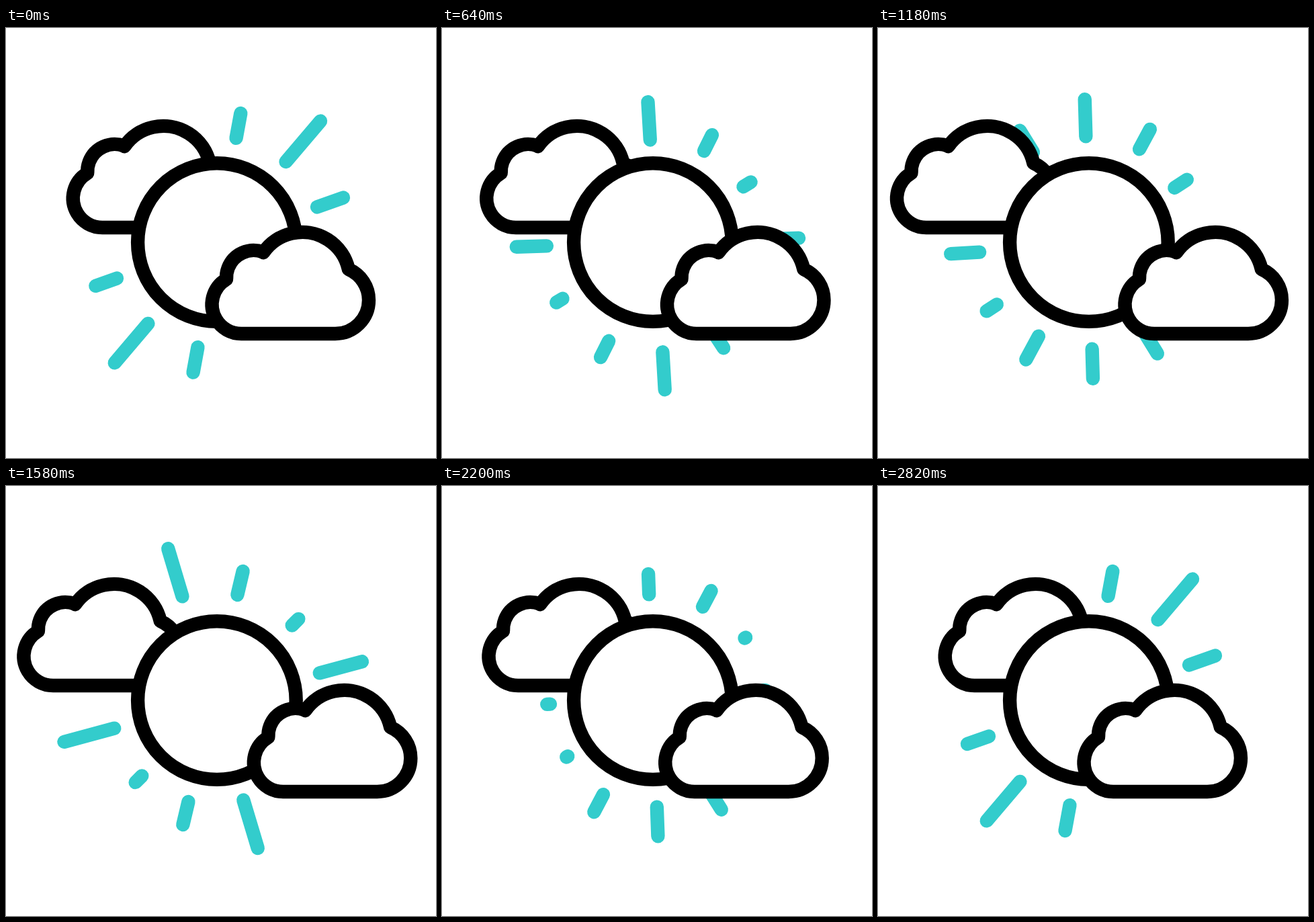
Recreate the animation shown at these times as an HTML page with a canvas. Size 640 by 640 pixels, loop 3.6 s.

```html
<!DOCTYPE html>
<html lang="en">
<head>
<meta charset="utf-8">
<title>Sun and clouds</title>
<style>
html, body { margin: 0; width: 100%; height: 100%; overflow: hidden; background: #fff; }
canvas { display: block; width: 640px; height: 640px; }
</style>
</head>
<body>
<canvas id="stage" width="640" height="640"></canvas>
<script>
const ctx = document.getElementById('stage').getContext('2d');
const LOOP = 3600, RUN = 2800, STEP = 20;
const CX = 314, CY = 319.5, INNER = 158.2, LEAD = 55;
const TEAL = '#33cccc';

const smooth = s => s * s * (3 - 2 * s);

// Eased value at t through [time, value] keys
function ease(keys, t) {
  const i = Math.max(1, keys.findIndex(k => k[0] >= t));
  const [t0, v0] = keys[i - 1], [t1, v1] = keys[i];
  return v0 + (v1 - v0) * smooth((t - t0) / (t1 - t0));
}

// Stretch of the rays over time, as a share of their full length
const SHORT = [[0, 1], [720, 0.28], [1200, 1], [1540, 0.36], [1900, 0.32], [2400, 1], [RUN, 1]];
const LONG = [[0, 1], [300, 1], [930, 0.4], [1500, 0.98], [2000, 0.27], [2580, 1], [RUN, 1]];
const PULSE = [[0, 0], [420, 1], [950, 0.25], [1480, 1], [2210, 0.06], [RUN, 0]];

const sun = { first: 10.4, lengths: [37.5, 79.4, 41.3, 38.6, 76.7, 34] };
const pulse = { first: 98.8, lengths: [33, 78, 37.8, 40, 78.5, 37] };

// Three rays 30 degrees apart, and three opposite
function rays({ first, lengths }, level) {
  lengths.forEach((full, i) => {
    const side = Math.floor(i / 3), slot = i % 3;
    const len = full * level(slot, side);
    if (len < 0.3) return;
    const a = (first + 30 * slot + 180 * side) * Math.PI / 180;
    const x = Math.sin(a), y = -Math.cos(a), end = INNER + len;
    ctx.beginPath();
    ctx.moveTo(x * INNER, y * INNER);
    ctx.lineTo(x * end, y * end);
    ctx.stroke();
  });
}

function drawRays(t) {
  ctx.save();
  ctx.strokeStyle = TEAL;
  ctx.translate(CX, CY);
  ctx.rotate(2 * Math.PI * smooth(t / RUN));
  // The far side runs slightly ahead of the near side
  rays(sun, (slot, side) => {
    const at = Math.min(RUN, Math.max(0, t + (side ? LEAD : -LEAD)));
    return ease(slot === 1 ? LONG : SHORT, at);
  });
  ctx.translate(7.05, -0.5);
  rays(pulse, () => ease(PULSE, t));
  ctx.restore();
}

function bump(cx, cy, r, x0, y0, x1, y1) {
  ctx.arc(cx, cy, r, Math.atan2(y0 - cy, x0 - cx), Math.atan2(y1 - cy, x1 - cx), true);
}

function paint() {
  ctx.fill();
  ctx.stroke();
}

function cloud(dx, dy) {
  ctx.save();
  ctx.translate(dx, dy);
  ctx.beginPath();
  bump(490, 405, 50, 490, 455, 510, 359);
  bump(441, 374.5, 70.6, 510, 359, 382.7, 334);
  bump(368.5, 371.5, 40.5, 382.7, 334, 328, 374);
  bump(350.2, 411.4, 43.6, 328, 374, 350.2, 455);
  ctx.closePath();
  paint();
  ctx.restore();
}

function draw(t) {
  const half = RUN / 2;
  const drift = smooth(1 - Math.abs(t - half) / half);
  ctx.fillStyle = '#fff';
  ctx.fillRect(0, 0, 640, 640);
  ctx.lineWidth = 20.4;
  ctx.lineCap = ctx.lineJoin = 'round';
  drawRays(t);
  ctx.strokeStyle = '#000';
  cloud(-206.8 - 76.8 * drift, -158);
  ctx.beginPath();
  ctx.arc(313.9, 319.1, 117.8, 0, 2 * Math.PI);
  paint();
  cloud(65.3 * drift, 0);
}

const start = performance.now();
function frame() {
  const t = Math.max(0, performance.now() - start) % LOOP;
  draw(Math.min(RUN, Math.floor(t / STEP) * STEP));
  requestAnimationFrame(frame);
}
frame();
</script>
</body>
</html>
```
